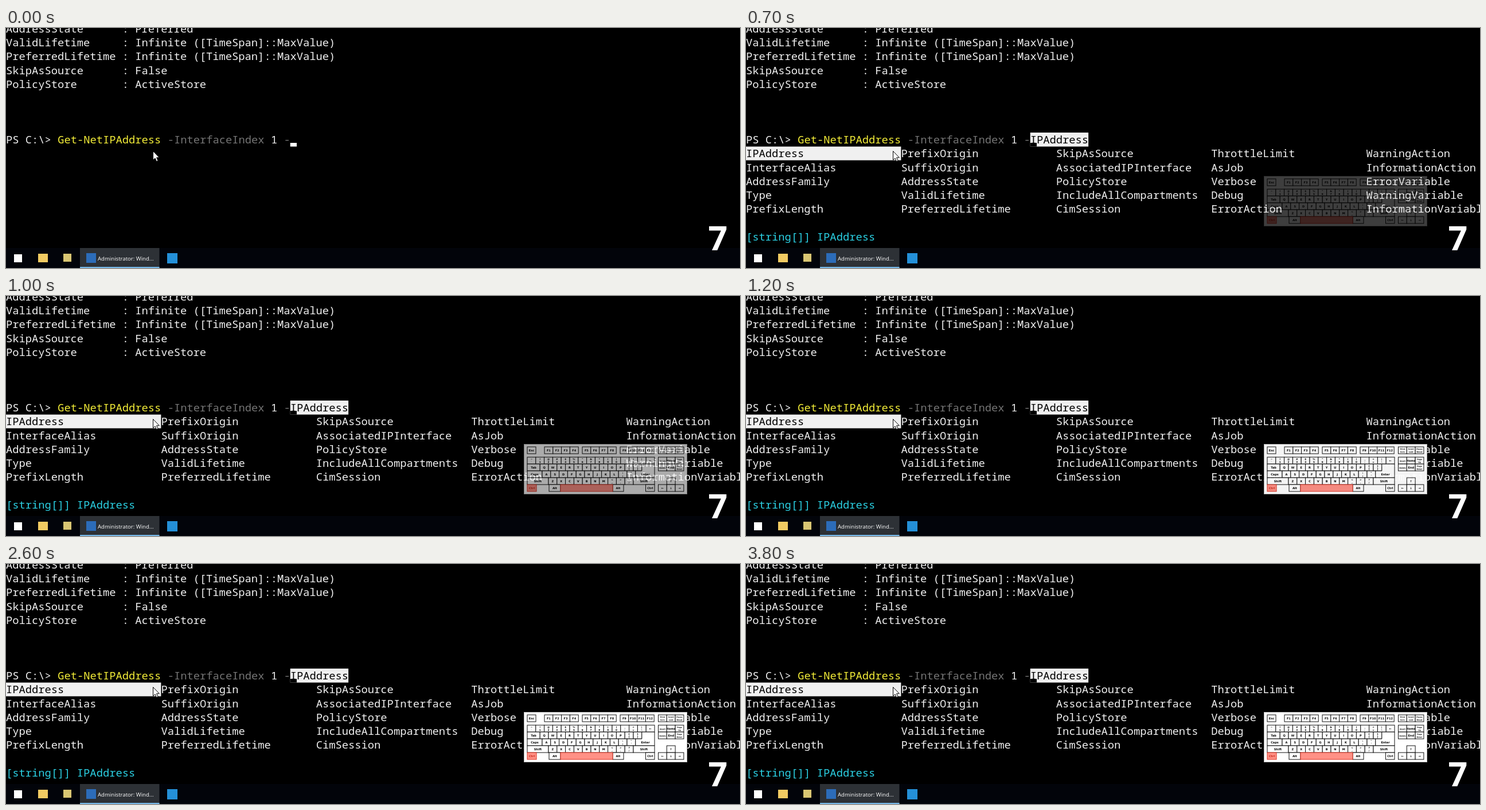
Animation, 1280 px wide and 420 px high, one loop 4000 ms. Source, as an HTML page:

```html
<!DOCTYPE html>
<html lang="en">
<head>
<meta charset="utf-8">
<title>Parameter completion</title>
<style>
html, body { margin: 0; width: 100%; height: 100%; overflow: hidden; background: #000; }
svg { display: block; }
text { white-space: pre; }
.term { font: 18.777px "Noto Sans Mono", monospace; }
.keys { font-family: "DejaVu Sans", sans-serif; font-weight: bold; text-anchor: middle; }
.keys rect, .keys path { fill: #fff; stroke: #111; }
.keys .hot { fill: #ff9186; stroke: #dc3524; }
.keys .hot + text { fill: #c9281a; }
</style>
</head>
<body>
<svg id="stage" width="1280" height="420" viewBox="0 0 1280 420"></svg>
<script>
const CELL = 11.266, LINE = 24.28, UNIT = 14.8;
const WHITE = '#f0f0f0', GRAY = '#747474', YELLOW = '#f3ed38', CYAN = '#2bd0e3';

const esc = s => s.replace(/&/g, '&amp;').replace(/</g, '&lt;');
const box = (x, y, w, h, fill) => `<rect x="${x}" y="${y}" width="${w}" height="${h}" fill="${fill}"/>`;

// Terminal text on the character grid
const write = (col, row, s, fill = WHITE) =>
  `<text x="${col * CELL}" y="${Math.round(7.8 + row * LINE)}" fill="${fill}">${esc(s)}</text>`;

const properties = [
  ['AddressState', 'Preferred'],
  ['ValidLifetime', 'Infinite ([TimeSpan]::MaxValue)'],
  ['PreferredLifetime', 'Infinite ([TimeSpan]::MaxValue)'],
  ['SkipAsSource', 'False'],
  ['PolicyStore', 'ActiveStore']
].map(([name, value], row) => write(0, row, name.padEnd(18) + ': ' + value)).join('');

const prompt = write(0, 8, 'PS C:\\>') + write(8, 8, 'Get-NetIPAddress', YELLOW) +
  write(25, 8, '-InterfaceIndex', GRAY) + write(41, 8, '1') + write(43, 8, '-', GRAY);

const choices = [
  'IPAddress InterfaceAlias AddressFamily Type PrefixLength',
  'PrefixOrigin SuffixOrigin AddressState ValidLifetime PreferredLifetime',
  'SkipAsSource AssociatedIPInterface PolicyStore IncludeAllCompartments CimSession',
  'ThrottleLimit AsJob Verbose Debug ErrorAction',
  'WarningAction InformationAction ErrorVariable WarningVariable InformationVariable'
].map((names, c) => names.split(' ').map((name, r) =>
  write(c * 24, 9 + r, name, c + r ? WHITE : '#000')).join('')).join('');

const caret = fill => box(44 * CELL, 201, CELL, 6.5, fill);
const menu = box(44 * CELL, 183, 9 * CELL, 24.5, WHITE) + caret('#000') + write(44, 8, 'IPAddress', '#000') +
  box(0, 207.5, 24 * CELL, 24, WHITE) + choices + write(0, 15, '[string[]] IPAddress', CYAN);

const pointer = `<path transform="translate(256.5 215.5)" fill="#fff" stroke="#000"
  d="M0 0V15.5L3.5 12.3 6 18 8.6 16.9 6.1 11.3H10.8Z"/>`;

const taskbar = box(0, 385, 1280, 35, '#02040a') + box(129, 385, 138.5, 35, '#2d3136') +
  box(129, 418, 138.5, 2, '#75b8e8') +
  box(14, 396, 14, 14, '#fff') + box(56, 395, 17, 15, '#f2cb62') + box(100, 395, 14, 14, '#d9c673') +
  box(140, 394, 17, 17, '#2c6cb9') + box(281, 394, 18, 18, '#2490d8') +
  '<text x="160" y="407" font-family="Open Sans, sans-serif" font-size="9.6" fill="#fff">Administrator: Wind...</text>';

const counter = '<text x="1224.5" y="388.5" font-family="Open Sans, sans-serif" font-size="59" font-weight="700" fill="#fff">7</text>';

// Keyboard: a label with a space is stacked on two lines
const label = (x, y, s, size) => `<text x="${x}" y="${y}" font-size="${size}">${esc(s)}</text>`;
function key(x, y, w, name = '', hot = '') {
  const mid = x + w / 2, [top, bottom] = name.split(' ');
  const size = top.length > 2 ? 3.1 : 4.2;
  return `<rect class="${hot}" x="${x}" y="${y}" width="${w}" height="12"/>` +
    (bottom ? label(mid, y + 5.2, top, size) + label(mid, y + 10, bottom, size)
      : label(mid, y + 7.9, top, top.length > 5 ? 3.1 : 5));
}
const row = (x, y, names) => names.map((name, i) => key(x + i * UNIT, y, UNIT, name)).join('');
const words = s => s.split(' ');
const pairs = s => words(s).map(p => p[0] + ' ' + p[1]);

const functionKeys = [939, 1005, 1071].map((x, g) =>
  row(x, 264, [1, 2, 3, 4].map(n => 'F' + (g * 4 + n)))).join('');

const keyboard = '<rect x="903.5" y="259.5" width="284" height="87" style="stroke:#bcbcbc"/>' +
  key(909, 264, 15, 'Esc') + functionKeys +
  row(1137.5, 264, ['Print Scrn', 'Scroll Lock', 'Pause Break']) +
  row(1137.5, 282, ['Insert', 'Home', 'Page Up']) +
  row(1137.5, 294, ['Delete', 'End', 'Page Down']) +
  row(909, 282, [...pairs('~` !1 @2 #3 $4 %5 ^6 &7 *8 (9 )0 _- += |\\'), '←']) +
  key(909, 294, 22.2, 'Tab') + row(931.2, 294, [...words('Q W E R T Y U I O P'), ...pairs('{[ }]')]) +
  key(909, 306, 26, 'Caps') + row(935, 306, [...words('A S D F G H J K L'), ...pairs(':; "\'')]) +
  '<path d="M1108.8 294H1131V318H1097.8V306H1108.8Z"/>' + label(1115, 313.7, 'Enter', 5) +
  key(909, 318, 37, 'Shift') + row(946, 318, [...words('Z X C V B N M'), ...pairs('<, >. ?/')]) +
  key(1094, 318, 37, 'Shift') +
  key(947, 330, 20, 'Alt') + key(1058, 330, 19, 'Alt') + key(1115.5, 330, 15.5, 'Ctrl') +
  row(1152.3, 318, ['↑']) + row(1137.5, 330, ['←', '↓', '→']) +
  key(909, 330, 16, 'Ctrl', 'hot') + key(967, 330, 91, '', 'hot');

const stage = document.getElementById('stage');
stage.innerHTML = `<g class="term">${properties}${prompt}<g id="caret">${caret('#fff')}</g><g id="menu">${menu}</g></g>
  ${pointer}${taskbar}<g id="keyboard" class="keys">${keyboard}</g>${counter}`;
const [caretLayer, menuLayer, keyboardLayer] = ['caret', 'menu', 'keyboard'].map(id => document.getElementById(id));

function draw(now) {
  const t = Math.floor(now % 4000 / 100) * 100;
  const open = t >= 700;
  caretLayer.setAttribute('opacity', open ? 0 : 1);
  menuLayer.setAttribute('opacity', open ? 1 : 0);
  keyboardLayer.setAttribute('opacity', Math.min(1, Math.max(0, (t - 530) / 700)));
  requestAnimationFrame(draw);
}
draw(performance.now());
</script>
</body>
</html>
```
